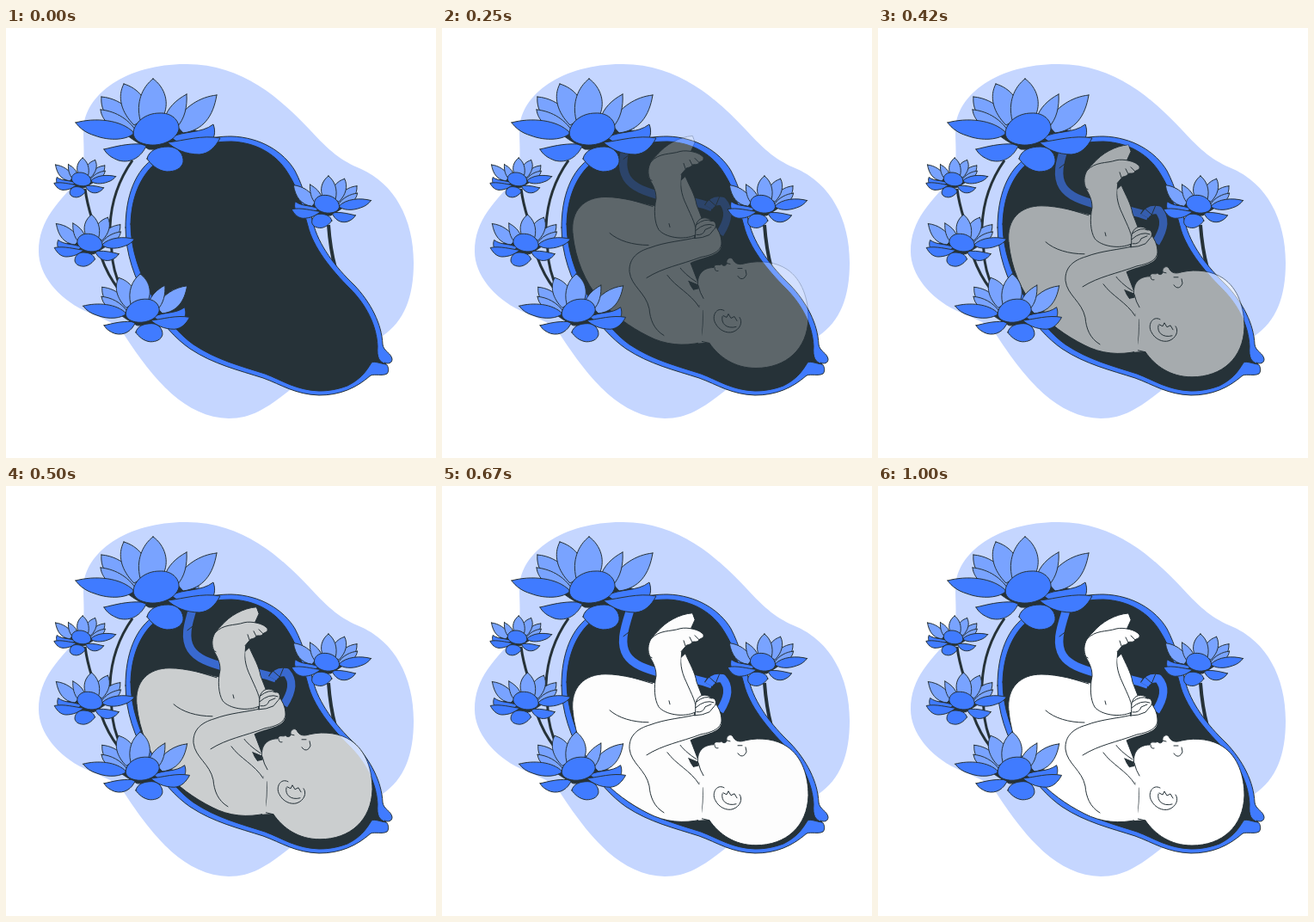
An HTML page that plays this animation: 500 by 500 pixels, repeating every 1040 ms.

```html
<!DOCTYPE html>
<html lang="en">
<head>
<meta charset="utf-8">
<title>Baby and lotus flowers</title>
<style>
  html, body { margin: 0; width: 100%; height: 100%; overflow: hidden; background: #fff; }
  svg { display: block; width: 100vw; height: 100vh; }
  path { stroke: #263238; stroke-width: 1; stroke-linejoin: round; stroke-linecap: round; vector-effect: non-scaling-stroke; }
  .blue { fill: #407bff; }
  .light { fill: #79a3ff; }
  .dark { fill: #263238; }
  .skin { fill: #fff; }
  .line { fill: none; }
  .plain { stroke: none; }
  .stem { fill: none; stroke-width: 3; stroke-linecap: butt; }
  .cord-edge { fill: none; stroke-width: 11.5; stroke-linecap: butt; }
  .cord { fill: none; stroke: #407bff; stroke-width: 9.5; stroke-linecap: butt; }
</style>
</head>
<body>
<svg viewBox="0 0 500 500">
  <defs>
    <g id="lotus">
      <path class="dark" d="M140 124L200 112L232 123L205 142L166 141L148 130Z"/>
      <path class="light" d="M111 80C124 81 135 87 143 95L156 120L142 120C121 112 109 97 111 80Z"/>
      <path class="light" d="M110 95C124 96 142 104 152 121L140 122C122 117 111 107 110 95Z"/>
      <path class="light" d="M245 78C225 80 207 92 196 111L206 122C229 119 241 103 245 78Z"/>
      <path class="light" d="M210 77C197 84 188 93 184 106L198 116C208 106 211 91 210 77Z"/>
      <path class="light" d="M137 65C129 80 134 98 149 113L164 104C166 84 154 70 137 65Z"/>
      <path class="light" d="M171 59C158 69 151 87 156 107L182 104C191 88 185 69 171 59Z"/>
      <path class="blue" d="M81 110C103 104 134 106 149 122C142 130 121 132 103 125C93 122 86 117 81 110Z"/>
      <path class="blue" d="M114 141C127 138 141 134 157 135L163 137C158 149 146 158 131 154C123 151 117 147 114 141Z"/>
      <path class="blue" d="M192 127C208 119 227 123 241 112C244 120 243 129 236 134L206 137Z"/>
      <path class="blue" d="M188 133C207 131 228 124 249 128C243 139 236 146 225 147C209 147 196 141 188 133Z"/>
      <path class="blue" d="M164 152C166 142 177 138 189 138C200 138 207 147 206 156C204 164 196 167 187 167C176 166 168 158 164 152Z"/>
      <path class="blue" d="M148 122C149 109 163 99 178 99C192 98 202 107 201 118C198 130 182 137 168 136C156 135 148 130 148 122Z"/>
    </g>
  </defs>

  <path class="plain" fill="#c5d6ff" d="M90 120C90 76 142 42 208 42C274 41 319 82 353 118C376 143 389 154 413 164C451 181 474 221 474 273C474 313 463 341 438 358C393 392 363 399 330 421C302 443 285 454 259 454C209 453 172 410 137 356C129 343 110 337 90 328C61 314 38 287 38 260C38 222 62 202 88 172C92 150 90 137 90 120Z"/>

  <path class="stem" d="M147 154Q123 188 121 230L123 260Q124 282 134 303M92 187Q94 203 100 222M111 267Q118 287 131 304"/>
  <path class="stem" style="stroke-width:4" d="M375 229Q377 257 383 279"/>

  <path class="blue" d="M139 232C139 196 150 165 174 150C205 132 239 126 262 126C296 127 323 144 336 166C346 185 351 206 357 226C363 252 383 278 405 299C424 319 437 344 438 368C439 376 448 378 449 385C449 390 444 391 440 389C445 392 446 399 443 402C437 405 430 402 424 404C407 419 388 427 364 427C336 426 321 415 299 407C271 398 241 391 214 373C182 351 139 293 139 232Z"/>
  <path class="dark" d="M145 228C146 190 161 162 188 147C216 136 243 132 262 132C291 133 315 147 328 169C341 189 345 209 351 230C357 255 378 281 400 303C419 322 431 346 432 370C431 384 434 388 442 391C434 390 429 387 425 389C418 401 411 409 397 416C386 420 376 422 364 422C337 421 322 410 301 402C273 393 245 386 218 368C187 346 145 287 145 228Z"/>

  <g id="baby" opacity="0">
    <path class="cord-edge" d="M219 120L218 147C211 169 207 184 215 197C222 208 237 213 255 218M276 223Q292 223 314 231"/>
    <path class="cord" d="M219 120L218 147C211 169 207 184 215 197C222 208 237 213 255 218M276 223Q292 223 314 231"/>
    <path class="line" d="M211 175L220 168"/>
    <path class="skin" d="M273 204L283 195C288 207 294 216 296 228L303 246L296 266L277 240Z"/>
    <path class="skin" d="M152 262C149 234 166 219 190 219C211 219 231 226 252 230L294 265L288 293L298 319L304 350L302 388C281 393 259 391 240 381C218 370 199 356 184 339C166 318 155 291 152 262Z"/>
    <path class="dark" d="M287 317L297 321L299 332Q291 328 287 317Z"/>
    <path class="line" d="M195 261C205 270 222 275 240 275M222 223L245 230M275 299Q282 309 296 318"/>
    <path class="skin" d="M291 148C276 149 260 158 250 170C242 177 239 185 240 196C245 205 249 210 249 221C246 234 247 249 252 257C259 266 281 270 295 263C297 254 290 242 284 228C278 216 276 203 279 192Q287 184 289 167L294 156Z"/>
    <path class="skin" d="M243 178C253 167 265 170 277 166C285 164 300 167 304 173C305 178 300 177 299 179C297 183 292 180 291 182C288 186 284 184 283 187L277 194C270 203 252 204 242 199C239 192 239 185 243 178Z"/>
    <path class="skin plain" d="M242 193L278 193L277 211L249 213Z"/>
    <path class="line" d="M299 179L294 174M291 182L288 176M283 186L281 180M264 250L265 254"/>

    <path class="skin" d="M298 325C295 310 303 301 316 301C318 295 322 300 325 297C327 300 331 299 331 296C330 291 335 288 338 291C341 298 347 298 353 296C371 292 389 295 401 303C419 315 426 338 426 360C425 396 400 418 365 418C340 418 322 405 311 389L302 388L304 350Z"/>
    <path class="skin plain" d="M293 327L303 325L312 388L298 389Z"/>
    <path class="line" d="M298 322Q300 331 304 337M299 345L300 350M303 351Q304 369 301 384M298 386L311 389"/>
    <path class="line" d="M317 301Q317 306 321 305M331 296L335 297M344 311C347 316 352 315 354 309L353 304M344 302L349 302"/>
    <path class="line" d="M328 351C319 346 313 358 318 366C322 374 331 378 338 376C347 373 350 364 346 359M326 358C324 366 331 373 342 370M327 357L331 359L333 355L336 360L340 358L343 363"/>

    <path class="cord-edge" d="M310 231Q315 222 326 224C336 235 332 248 323 262"/>
    <path class="cord" d="M310 231Q315 222 326 224C336 235 332 248 323 262"/>
    <path class="line" d="M309 221L318 229M323 218L318 230"/>

    <path class="skin plain" d="M218 306C217 290 228 282 242 278C260 271 281 270 295 267L316 251Q325 260 325 274C325 287 307 288 292 294L263 308Q284 331 303 349L302 388L258 382L241 348Z"/>
    <path class="line" d="M258 380C246 373 242 361 241 349C237 330 220 323 218 306C217 290 228 282 242 278C260 271 281 270 296 266M238 313C257 301 277 298 301 289C317 286 326 281 325 270Q324 260 317 252M262 310C272 324 289 331 299 347"/>
    <path class="skin" d="M294 267C296 260 293 254 297 248C301 241 311 243 313 247C319 246 320 254 316 257L311 263Q303 267 294 267Z"/>
    <path class="line" d="M296 251Q306 243 313 247M295 258Q306 248 316 252M296 263Q304 264 306 257L313 254"/>
  </g>

  <use href="#lotus"/>
  <use href="#lotus" transform="translate(89 286) scale(.737 .73) translate(-80 -59)"/>
  <use href="#lotus" transform="translate(150 217) scale(-.555 .557) translate(-80 -59)"/>
  <use href="#lotus" transform="translate(425 172) scale(-.55 .56) translate(-80 -59)"/>
  <use href="#lotus" transform="translate(128 151) scale(-.427 .425) translate(-80 -59)"/>
</svg>
<script>
  const LOOP = 1040, STEP = 1000 / 24;
  const baby = document.getElementById('baby');
  const bezier = (a, b, s) => 3 * a * s * (1 - s) ** 2 + 3 * b * s * s * (1 - s) + s ** 3;

  // Ease with a small overshoot: cubic-bezier(.36, -.01, .5, 1.38)
  function ease(x) {
    let lo = 0, hi = 1;
    for (let i = 0; i < 24; i++) {
      const mid = (lo + hi) / 2;
      if (bezier(.36, .5, mid) < x) lo = mid; else hi = mid;
    }
    return bezier(-.01, 1.38, lo);
  }

  const start = performance.now();
  function draw() {
    const time = (performance.now() - start) % LOOP;
    const step = Math.floor((time + 5) / STEP);
    const k = step ? ease(Math.min(1, (step + .4) / 24.4)) : 0;
    baby.setAttribute('opacity', Math.max(0, Math.min(1, k)));
    baby.setAttribute('transform', `translate(0 ${30 * (k - 1)})`);
    requestAnimationFrame(draw);
  }
  draw();
</script>
</body>
</html>
```
